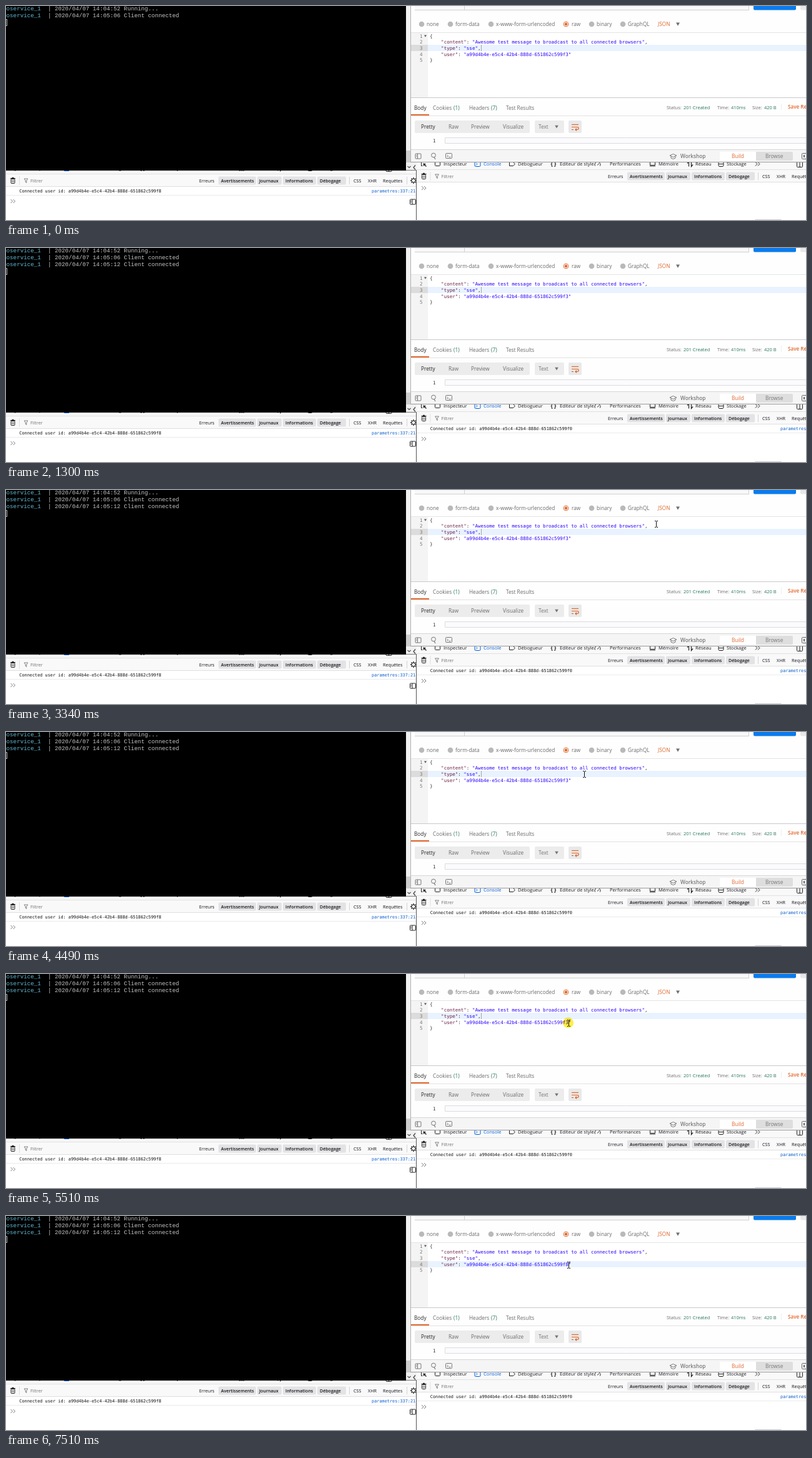
Write an HTML page with a canvas that moves like this. It is 1280 by 342 pixels and loops after 8 s.

```html
<!DOCTYPE html>
<html lang="en">
<head>
<meta charset="utf-8">
<title>Broadcast demo</title>
<style>
  html, body { margin: 0; width: 100%; height: 100%; overflow: hidden; background: #fff; }
  canvas { display: block; }
</style>
</head>
<body>
<canvas id="stage" width="1280" height="342"></canvas>
<script>
const ctx = document.getElementById('stage').getContext('2d');
const LOOP = 8000;
const sans = (size, weight = 400) => `${weight} ${size}px "Open Sans", sans-serif`;
const mono = size => `${size}px "DejaVu Sans Mono", monospace`;
const UI = sans(8.25), SMALL = sans(7.5), TOOL = sans(7.2), TAB = sans(7.6);
const CODE = mono(7.52), LOG = mono(6.86);
const TERM = '9.22px "Liberation Mono", monospace';
const ORANGE = '#e0672c', GREY = '#6b6b6b', DARK = '#303030', BLUE = '#0060df';

// Pointer path: start, end, number of steps, destination.
const MOVES = [
  [2690, 2690, 1, 1155, 334],
  [2785, 2880, 2, 947, 102],
  [3090, 3257, 3, 1028, 47],
  [3340, 3340, 1, 1040, 54],
  [3960, 4190, 4, 973, 65],
  [4360, 4490, 3, 925, 67],
  [4570, 5030, 7, 902, 75],
  [5220, 5280, 2, 900, 78]
];

function rect(x, y, w, h, color) {
  ctx.fillStyle = color;
  ctx.fillRect(x, y, w, h);
}

function box(x, y, w, h, fill, stroke, radius = 0) {
  ctx.beginPath();
  ctx.roundRect(x, y, w, h, radius);
  if (fill) { ctx.fillStyle = fill; ctx.fill(); }
  if (stroke) { ctx.strokeStyle = stroke; ctx.lineWidth = 1; ctx.stroke(); }
}

function text(str, x, y, font, color = DARK) {
  ctx.font = font;
  ctx.fillStyle = color;
  ctx.fillText(str, x, y);
}

function line(color, width, ...points) {
  ctx.beginPath();
  for (let i = 0; i < points.length; i += 2) ctx.lineTo(points[i], points[i + 1]);
  ctx.strokeStyle = color;
  ctx.lineWidth = width;
  ctx.stroke();
}

function circle(x, y, r, fill, stroke) {
  ctx.beginPath();
  ctx.arc(x, y, r, 0, Math.PI * 2);
  if (fill) { ctx.fillStyle = fill; ctx.fill(); }
  if (stroke) { ctx.strokeStyle = stroke; ctx.lineWidth = 1; ctx.stroke(); }
}

function triangle(x, y, r, color) {
  ctx.beginPath();
  ctx.moveTo(x - r, y - r * .8);
  ctx.lineTo(x + r, y - r * .8);
  ctx.lineTo(x, y + r * .9);
  ctx.fillStyle = color;
  ctx.fill();
}

function chevrons(x, y, color) {
  for (const dx of [-3.5, .5]) line(color, 1, x + dx, y - 3, x + dx + 3, y, x + dx, y + 3);
}

function clipped(x, y, w, h, draw) {
  ctx.save();
  ctx.beginPath();
  ctx.rect(x, y, w, h);
  ctx.clip();
  draw();
  ctx.restore();
}

function terminal(t) {
  rect(0, 0, 640, 263, '#000');
  rect(640, 0, 17, 262, '#f0f0f0');
  rect(640, 231, 7, 19, '#cdcdcd');
  line('#505050', 1.2, 642.5, 256, 645, 258.5, 647.5, 256);
  line('#404040', 1.2, 655, 254.5, 652, 258, 655, 261.5);
  const logs = ['04:52 Running...', '05:06 Client connected'];
  if (t >= 1300) logs.push('05:12 Client connected');
  logs.forEach((entry, i) => {
    const y = 7 + 11 * i;
    text('goservice_1', -5, y, TERM, '#62b9d2');
    text('| 2020/04/07 14:' + entry, 66.9, y, TERM, '#c4c4c4');
  });
  box(-3.5, logs.length * 11 - .5, 5, 10, null, '#c4c4c4');
}

function trash(x, y) {
  rect(x - 4, y - 4, 8, 1.3, '#222');
  rect(x - 1.5, y - 5.2, 3, 1.2, '#222');
  box(x - 3, y - 2.5, 6, 7, null, '#222', 1);
  line('#222', .7, x - 1, y - 1, x - 1, y + 3);
  line('#222', .7, x + 1, y - 1, x + 1, y + 3);
}

function funnel(x, y) {
  line('#777', .9, x - 3, y - 3, x + 3, y - 3, x + .8, y, x + .8, y + 3.5, x - .8, y + 2.3, x - .8, y, x - 3, y - 3);
}

function gear(x, y) {
  circle(x, y, 3, null, '#222');
  for (let i = 0; i < 8; i++) {
    const a = i * Math.PI / 4, c = Math.cos(a), s = Math.sin(a);
    line('#222', 1.4, x + 3 * c, y + 3 * s, x + 5 * c, y + 5 * s);
  }
}

function sidebarIcon(x, y, color) {
  box(x - 4.5, y - 4, 9, 8, null, color, 1);
  line(color, 1, x - 1, y - 4, x - 1, y + 4);
  line(color, .8, x - 3.5, y - 1.5, x - 2, y - 1.5);
  line(color, .8, x - 3.5, y + .5, x - 2, y + .5);
}

function tabIcons(y) {
  const ink = '#222';
  line(ink, 1, 14, y - 4, 7, y - 4, 7, y + 3, 9, y + 3);
  line(ink, 1.4, 15, y + 4, 11, y, 11, y + 3);
  line(ink, 1.4, 11, y, 14, y);
  box(29, y - 4, 8, 7, null, ink, 1);
  box(92.5, y - 4, 9, 8, null, BLUE, 1.5);
  line(BLUE, 1, 94.5, y - 2, 96.5, y, 94.5, y + 2);
  line(ink, 1, 148, y - 3, 154, y - 3, 157, y, 154, y + 3, 148, y + 3, 148, y - 3);
  text('{ }', 214, y + 2.7, sans(8.5, 700), ink);
  ctx.beginPath();
  ctx.arc(289, y + 1, 4.5, Math.PI * .85, Math.PI * 2.15);
  ctx.strokeStyle = ink;
  ctx.lineWidth = 1;
  ctx.stroke();
  line(ink, 1, 289, y + 2, 291, y - 1);
  box(373, y - 3, 8, 5, null, ink);
  for (let i = 0; i < 4; i++) rect(373 + i * 2.3, y + 2, 1, 2.5, ink);
  line(ink, 1.2, 435, y + 4, 435, y - 4, 432.5, y - 1);
  line(ink, 1.2, 439, y - 4, 439, y + 4, 441.5, y + 1);
  box(482.5, y - 4, 8, 8, null, ink, 2);
  line(ink, 1, 482.5, y, 490.5, y);
  chevrons(545, y, ink);
  box(608, y - 4, 9, 9, null, ink, 1);
  line(ink, 1, 612.5, y - 4, 612.5, y + 5);
}

// Developer tools, laid out for the left window; the right one is shifted.
function devtools(dx, dy, rightDx, id) {
  ctx.save();
  ctx.translate(dx, dy);
  rect(-10, 240, 680, 110, '#fff');
  rect(-10, 240, 680, 49, '#f9f9fa');
  rect(-10, 268, 680, 1, '#e0e0e2');
  rect(-10, 288, 680, 1, '#e0e0e2');
  tabIcons(259.5);
  const tabs = [['Inspecteur', 42.5], ['Console', 106.5], ['Débogueur', 161.5], ['Éditeur de style', 228.5],
    ['Performances', 308.5], ['Mémoire', 386.5], ['Réseau', 445.5], ['Stockage', 495.5]];
  for (const [label, x] of tabs) text(label, x, 262.4, TAB, label === 'Console' ? BLUE : '#1c1c20');
  trash(11, 279);
  rect(21, 272, 1, 14, '#e0e0e2');
  funnel(32, 279);
  text('Filtrer', 39, 281.6, TOOL, '#737373');
  ctx.restore();

  ctx.save();
  ctx.translate(rightDx, dy);
  const filters = [['Avertissements', 344, 340, 60], ['Journaux', 405, 402, 39],
    ['Informations', 447, 443, 53], ['Débogage', 502, 498, 46]];
  for (const [label, x, left, width] of filters) {
    box(left, 272.5, width, 13, '#e3e3e5', null, 2);
    text(label, x, 281.6, sans(7.05, 600), '#15151a');
  }
  for (const [label, x] of [['Erreurs', 309], ['CSS', 556], ['XHR', 579], ['Requêtes', 603]])
    text(label, x, 281.6, TOOL, '#15151a');
  rect(549, 273, 1, 12, '#d4d4d8');
  rect(641, 273, 1, 12, '#d4d4d8');
  gear(652, 279);
  ctx.restore();

  ctx.save();
  ctx.translate(dx, dy);
  if (id) {
    text('Connected user id: a99d4b4e-e5c4-42b4-888d-651862c599' + id, 21.3, 298.4, LOG, '#111');
    text('parametres:337:21', 585 + rightDx - dx, 298.4, LOG, '#0a5fd0');
    rect(-10, 302, 680, 1, '#ebebee');
  }
  chevrons(11, id ? 312 : 298, '#7c7c80');
  if (id) sidebarIcon(651 + rightDx - dx, 313, '#222');
  ctx.restore();
}

function requestBar() {
  rect(647, 0, 633, 250, '#fefefe');
  rect(654, 0, 535, 6, '#f8f8f8');
  rect(733, 0, 1, 6, '#d0d0d0');
  rect(654, 6, 535, 1, '#d0d0d0');
  rect(1188, 0, 1, 6, '#d0d0d0');
  box(1196, -5, 68, 11.5, '#097bed', null, 2);
  box(1271, -5, 20, 11.5, '#e8e8e8', null, 2);

  const kinds = [['none', 665, 673], ['form-data', 711, 719], ['x-www-form-urlencoded', 776, 784],
    ['raw', 896, 905], ['binary', 937, 945], ['GraphQL', 987, 995]];
  for (const [label, cx, x] of kinds) {
    circle(cx, 29, 4.3, label === 'raw' ? ORANGE : '#b9b9b9');
    if (label === 'raw') {
      circle(cx, 29, 3.3, '#fff');
      circle(cx, 29, 2.3, ORANGE);
    }
    text(label, x, 32, UI, GREY);
  }
  text('JSON', 1043, 32, UI, ORANGE);
  triangle(1075, 29, 3, '#6f6f6f');
}

function editor(t) {
  const top = 43, pitch = 9.65, left = 678, cell = 4.527;
  const active = t < 5660 ? 2 : 3;
  const tail = t < 6470 ? 'f3' : t < 6870 ? 'f' : 'f8';
  const rows = [
    ['{'],
    ['"content"', '"Awesome test message to broadcast to all connected browsers"', ','],
    ['"type"', '"sse"', ','],
    ['"user"', `"a99d4b4e-e5c4-42b4-888d-651862c599${tail}"`, ''],
    ['}']
  ];
  rect(647, top, 633, 104, '#fff');
  rect(647, top, 28, 104, '#f4f4f4');
  rect(647, top - 1, 633, 1, '#e4e4e4');
  const rowTop = active === 2 ? 62 : 72;
  rect(647, rowTop, 28, 10, '#dcdcdc');
  rect(675, rowTop, 605, 10, '#e9f3ff');
  rows.forEach(([key, value, end], i) => {
    const y = top + 7.8 + pitch * i;
    text(i + 1, 662, y, CODE, '#777');
    if (!value) return text(key, left, y, CODE, '#333');
    let x = left + 4 * cell;
    for (const [part, color] of [[key, '#6b1f45'], [': ', '#333'], [value, '#2a00ff'], [end, '#333']]) {
      text(part, x, y, CODE, color);
      x += part.length * cell;
    }
  });
  triangle(671, 48, 2, '#555');
  rect(647, 146, 633, 1, '#c9c9c9');

  const blinkOff = (t >= 6130 && t < 6470) || t >= 7510;
  if (active === 2) rect(760, 62, 1, 10, '#a4a4a4');
  else if (!blinkOff) rect(tail === 'f' ? 895 : 900, 72, 1, 10, '#555');
}

function response() {
  rect(647, 175, 633, 1, '#e2e2e2');
  text('Body', 653, 166, UI, '#282828');
  rect(647, 173, 30, 2, ORANGE);
  const green = '#28785a';
  text('Cookies', 683, 166, UI, GREY);
  text('(1)', 716, 166, UI, green);
  text('Headers', 741, 166, UI, GREY);
  text('(7)', 776, 166, UI, green);
  text('Test Results', 800, 166, UI, GREY);
  for (const [label, x, value, vx] of [['Status:', 1057, '201 Created', 1084],
    ['Time:', 1138, '410ms', 1160], ['Size:', 1194, '420 B', 1213]]) {
    text(label, x, 164.6, SMALL, GREY);
    text(value, vx, 164.6, SMALL, green);
  }
  rect(1240, 156, 1, 10, '#eee');
  text('Save Response', 1251, 164.3, sans(8.1, 600), ORANGE);

  box(654, 183, 184, 20, '#ececec', null, 2);
  for (const [label, x] of [['Pretty', 664], ['Raw', 708], ['Preview', 744], ['Visualize', 795]])
    text(label, x, 196, UI, label === 'Pretty' ? '#282828' : GREY);
  box(846, 183, 47, 20, '#ececec', null, 2);
  text('Text', 852, 196, UI, '#777');
  triangle(881, 193, 2.8, '#777');
  box(900, 183, 21, 20, '#e9e9e9', null, 2);
  line(ORANGE, 1.2, 905, 189.5, 916, 189.5);
  line(ORANGE, 1.2, 905, 193.5, 915, 193.5, 916, 194.5, 916, 196.5, 915, 197.5, 911, 197.5);
  line(ORANGE, 1.2, 913, 195.5, 911, 197.5, 913, 199.5);
  line(ORANGE, 1.2, 905, 197.5, 908, 197.5);
  text('1', 683, 218, CODE, '#333');
  box(702.5, 210.5, 600, 9, '#fbfbfd', '#dcdce0');

  rect(647, 230, 633, 20, '#f5f5f5');
  rect(647, 229, 633, 1, '#d6d6d6');
  sidebarIcon(659.5, 240, '#777');
  circle(684, 238.5, 3.4, null, '#777');
  line('#777', 1.2, 685, 241.5, 687, 245);
  box(703.5, 235.5, 10, 8, null, '#777', 1);
  line('#777', 1, 705.5, 238, 707.5, 239.7, 705.5, 241.5);
  line('#777', 1, 708.5, 241.5, 711.5, 241.5);
  line('#777', 1, 1062, 239, 1067.5, 236.5, 1073, 239, 1067.5, 241.5, 1062, 239);
  line('#777', 1, 1064, 240.5, 1064, 243, 1067.5, 244.5, 1071, 243, 1071, 240.5);
  text('Workshop', 1079, 243, sans(8.25, 600), '#777');
  box(1142.5, 233.5, 116, 13, '#dedede', '#dedede', 1);
  rect(1142, 233, 58, 14, '#fff');
  text('Build', 1161, 243, UI, ORANGE);
  text('Browse', 1215, 243, UI, '#777');
  box(1273.5, 235.5, 10, 9, null, '#666', 1);
  rect(1276, 238, 2, 4, '#666');
  rect(647, 0, 1, 250, '#b0b0b0');
  rect(647, 249, 633, 1, '#9a9a9a');
}

function pointerAt(t) {
  let at = null;
  for (const [start, end, steps, x, y] of MOVES) {
    if (t < start) break;
    const gap = (end - start) / (steps - 1 || 1);
    const done = gap ? Math.min(steps, Math.floor((t - start) / gap + 1e-6) + 1) : 1;
    const k = done / steps, from = at || [x, y];
    at = [from[0] + (x - from[0]) * k, from[1] + (y - from[1]) * k];
  }
  return at && at.map(Math.round);
}

function pointer(t) {
  const at = pointerAt(t);
  if (!at) return;
  const [x, y] = at;
  if (t >= 5510 && t < 5660) {
    ctx.globalCompositeOperation = 'multiply';
    circle(x - .5, y, 8.5, '#ffee48');
    ctx.globalCompositeOperation = 'source-over';
  }
  rect(x, y - 4, 1, 9, '#111');
  for (const edge of [y - 5, y + 5]) {
    rect(x - 2, edge, 2, 1, '#111');
    rect(x + 1, edge, 2, 1, '#111');
  }
}

function draw(t) {
  rect(0, 0, 1280, 342, '#fff');
  terminal(t);
  clipped(0, 263, 656, 79, () => devtools(0, 0, 0, 'f8'));
  clipped(657, 250, 623, 92, () => devtools(657.5, -7, 654, t >= 1070 ? 'f0' : ''));
  rect(640, 262, 17, 1, '#777');
  rect(656, 262, 1, 80, '#555');
  for (let x = 1199; x < 1240; x += 2) rect(x, 341, 1, 1, '#999');
  requestBar();
  editor(t);
  response();
  pointer(t);
}

const began = performance.now();
function tick() {
  draw((performance.now() - began) % LOOP);
  requestAnimationFrame(tick);
}
tick();
</script>
</body>
</html>
```
